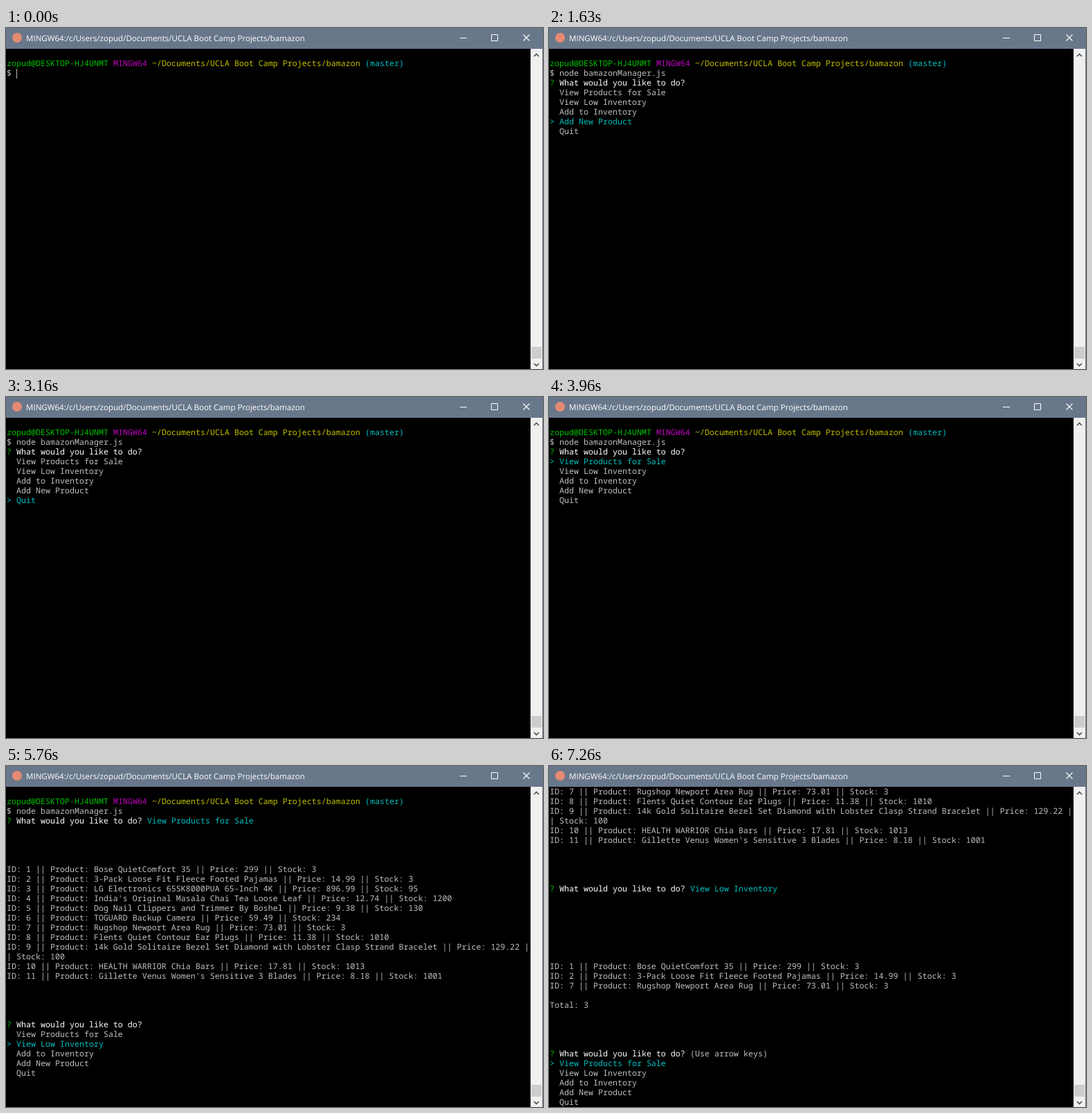
Recreate the animation shown at these times as an HTML page. Size 776x492 px, loop 8 s.

```html
<!DOCTYPE html>
<html lang="en">
<head>
<meta charset="utf-8">
<title>Terminal</title>
<style>
  html, body { margin: 0; width: 100%; height: 100%; overflow: hidden; background: #000; }
  svg { display: block; width: 776px; height: 492px; }
  text { white-space: pre; text-rendering: geometricPrecision; }
  #title { font: 11.55px "Open Sans", "Noto Sans", sans-serif; fill: #fff; }
  #screen { font: 11.667px "Noto Sans Mono", "DejaVu Sans Mono", monospace; }
</style>
</head>
<body>
<svg viewBox="0 0 776 492" xmlns="http://www.w3.org/2000/svg">
  <rect width="776" height="492" fill="#000"/>
  <g id="screen"></g>
  <rect id="cursor" width="1" height="14" fill="#bfbfbf"/>

  <rect width="776" height="30" fill="#69778b"/>
  <circle cx="16" cy="14" r="7" fill="#e58a72"/>
  <text id="title" x="29" y="19">MINGW64:/c/Users/zopud/Documents/UCLA Boot Camp Projects/bamazon</text>
  <g fill="none" stroke="#fff">
    <path d="M656 14.5h10M701.5 9.5h9v9h-9z"/>
    <path d="M747.5 9.5l9 9m0-9l-9 9" stroke-width="1.1"/>
  </g>

  <rect x="758" y="30" width="17" height="462" fill="#f0f0f0"/>
  <rect x="775" y="30" width="1" height="462" fill="#69778b"/>
  <rect x="759" y="460" width="15" height="17" fill="#cdcdcd"/>
  <path d="M763 41l3.5-3.5 3.5 3.5M763 484l3.5 3.5 3.5-3.5" fill="none" stroke="#505050" stroke-width="1.7"/>
</svg>
<script>
const LOOP = 8000, CELL = 7, LINE = 14, LEFT = 1, TOP = 31;
const GRAY = '#bfbfbf', WHITE = '#fff', GREEN = '#00bf00',
      CYAN = '#00bfbf', PINK = '#bf00bf', YELLOW = '#bfbf00';

const screen = document.getElementById('screen');
const cursor = document.getElementById('cursor');

const options = ['View Products for Sale', 'View Low Inventory', 'Add to Inventory', 'Add New Product', 'Quit'];

const products = [
  ['Bose QuietComfort 35', '299', 3],
  ['3-Pack Loose Fit Fleece Footed Pajamas', '14.99', 3],
  ['LG Electronics 65SK8000PUA 65-Inch 4K', '896.99', 95],
  ["India's Original Masala Chai Tea Loose Leaf", '12.74', 1200],
  ['Dog Nail Clippers and Trimmer By Boshel', '9.38', 130],
  ['TOGUARD Backup Camera', '59.49', 234],
  ['Rugshop Newport Area Rug', '73.01', 3],
  ['Flents Quiet Contour Ear Plugs', '11.38', 1010],
  ['14k Gold Solitaire Bezel Set Diamond with Lobster Clasp Strand Bracelet', '129.22', 100],
  ['HEALTH WARRIOR Chia Bars', '17.81', 1013],
  ["Gillette Venus Women's Sensitive 3 Blades", '8.18', 1001]
].map(([name, price, stock], i) => ({
  stock, line: `ID: ${i + 1} || Product: ${name} || Price: ${price} || Stock: ${stock}`
}));

// A row is a list of [text, colour] runs.
const plain = s => [[s, GRAY]];
const blank = n => Array(n).fill([]);
const wrap = s => s.match(/.{1,108}/g).map(plain);
const ask = (answer, color) =>
  [['?', GREEN], [' What would you like to do? ', WHITE], [answer, color]];
const menu = (pick, hint = '') => [
  ask(hint, GRAY),
  ...options.map((o, i) => i === pick ? [['> ' + o, CYAN]] : plain('  ' + o))
];
const freshMenu = () => menu(0, '(Use arrow keys)');

const prompt = [
  [],
  [['zopud@DESKTOP-HJ4UNMT', GREEN], [' MINGW64', PINK],
   [' ~/Documents/UCLA Boot Camp Projects/bamazon', YELLOW], [' (master)', CYAN]]
];
const command = [...prompt, plain('$ node bamazonManager.js')];
const stockList = [
  ...command, ask(options[0], CYAN), ...blank(4),
  ...products.flatMap(p => wrap(p.line)), ...blank(4)
];
const lowList = [
  ...stockList, ask(options[1], CYAN), ...blank(7),
  ...products.filter(p => p.stock < 5).map(p => plain(p.line)),
  [], plain('Total: 3'), ...blank(4)
];

// [start time, rows, cursor column and row]
const steps = [
  [0, [...prompt, plain('$ ')], [2, 2]],
  [260, command],
  [300, command, [25, 2]],
  [500, command, [0, 3]],
  [930, command],
  [1130, [...command, ...freshMenu()]],
  ...[[1430, 1], [1530, 2], [1630, 3], [1960, 4], [2000, 0], [2660, 4], [2930, 0],
      [3160, 4], [3530, 3], [3760, 2], [3860, 1], [3960, 0]]
    .map(([t, pick]) => [t, [...command, ...menu(pick)]]),
  [4760, [...stockList, ...freshMenu()]],
  ...[[5760, 1], [5930, 2], [6100, 1]]
    .map(([t, pick]) => [t, [...stockList, ...menu(pick)]]),
  [7260, [...lowList, ...freshMenu()].slice(14)]
];

function addText(str, col, row, color) {
  const el = document.createElementNS('http://www.w3.org/2000/svg', 'text');
  const lead = str.length - str.trimStart().length;
  el.setAttribute('x', LEFT + (col + lead) * CELL);
  el.setAttribute('y', TOP + row * LINE + 10);
  el.setAttribute('fill', color);
  el.textContent = str.trim();
  screen.append(el);
}

function draw([, rows, caret]) {
  screen.replaceChildren();
  rows.forEach((runs, row) => {
    let col = 0;
    for (const [str, color] of runs) {
      if (str.trim()) addText(str, col, row, color);
      col += str.length;
    }
  });
  cursor.style.display = caret ? '' : 'none';
  if (caret) {
    cursor.setAttribute('x', LEFT + caret[0] * CELL);
    cursor.setAttribute('y', TOP + caret[1] * LINE);
  }
}

let shown;
function render(now) {
  const t = now % LOOP;
  const step = steps.findLast(s => s[0] <= t);
  if (step !== shown) draw(shown = step);
}

const start = performance.now();
function tick() {
  render(performance.now() - start);
  requestAnimationFrame(tick);
}
tick();
</script>
</body>
</html>
```
